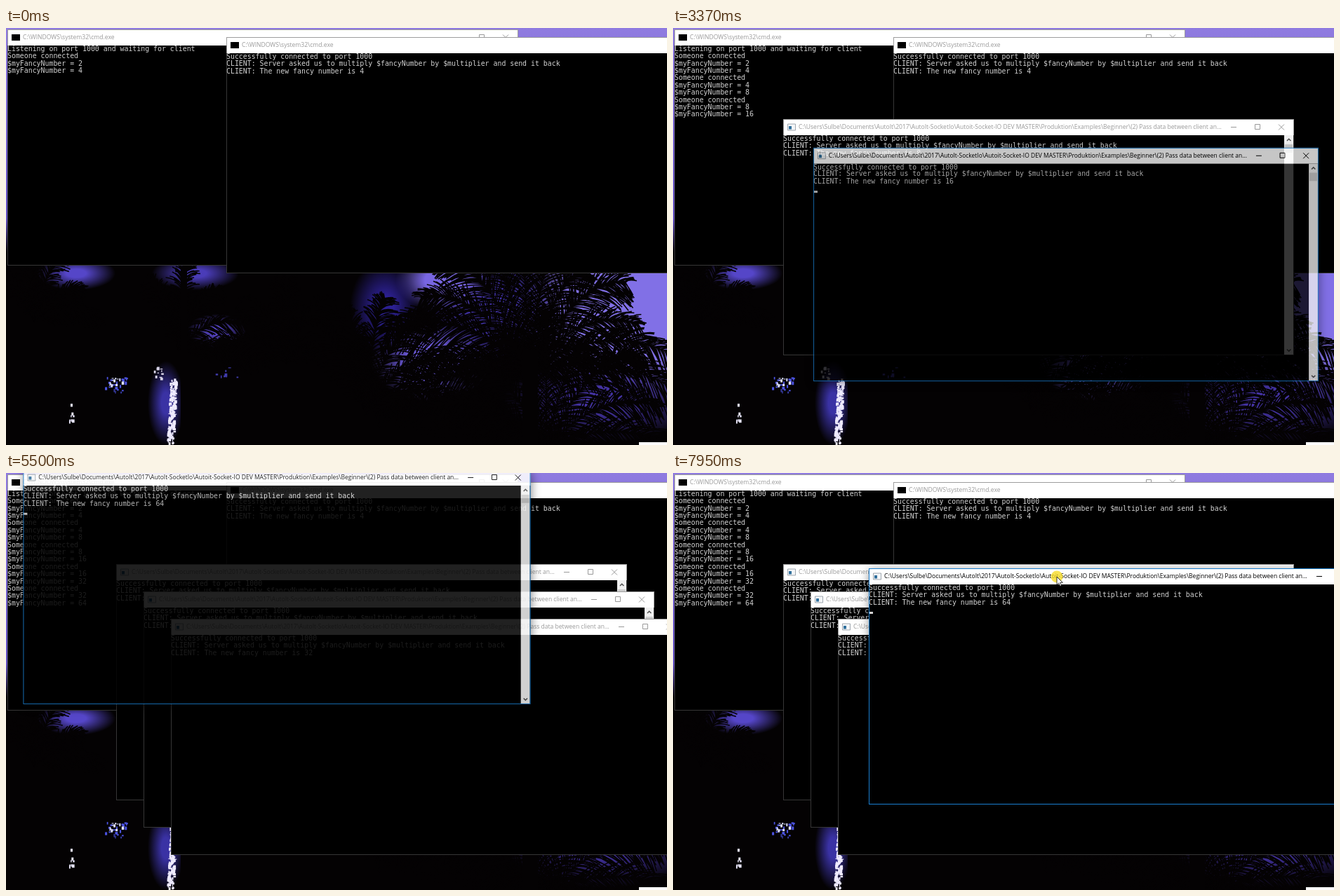
An HTML page with a canvas that plays this animation: 942 px wide and 595 px high, repeating every 8000 ms.

```html
<!DOCTYPE html>
<html lang="en">
<head>
<meta charset="utf-8">
<title>Socket demo</title>
<style>
  html, body { margin: 0; width: 100%; height: 100%; overflow: hidden; background: #040203; }
  #stage { position: absolute; left: 0; top: 0; width: 942px; height: 595px; overflow: hidden; }
  #photo { position: absolute; left: 0; top: 0; }
  .win { position: absolute; left: 0; top: 0; width: 728px; height: 337px; background: #000; color: #999; }
  .win::after { content: ""; position: absolute; inset: 0; border: 1px solid rgba(90, 90, 90, .6); }
  .win.active { color: #000; box-shadow: 1px 3px 13px rgba(0, 0, 0, .5); }
  .win.active::after { border-color: #1a7fd0; }
  .bar { position: absolute; left: 0; top: 0; width: 100%; height: 23px; background: #fff; }
  .name { position: absolute; left: 22px; top: 0; white-space: pre; font: 8.55px/23px "Open Sans", "Noto Sans", sans-serif; }
  .win svg { position: absolute; left: 0; top: 0; fill: none; }
  .text { position: absolute; left: 0; top: 22.8px; margin: 0; color: #d2d2d2;
          font: 9.88px/10.4px "DejaVu Sans Mono", monospace; }
  .caret { position: absolute; left: 0; top: 62px; width: 6px; height: 3px; background: #d4d4d4; }
  #pointer { position: absolute; left: 0; top: 0; width: 30px; height: 30px; }
</style>
</head>
<body>
<div id="stage">
  <canvas id="photo" width="942" height="595"></canvas>
</div>
<script>
const LOOP = 8000;
const stage = document.getElementById('stage');
const mix = (a, b, u) => a + (b - a) * u;

// ---------- wallpaper ----------
function paintPhoto() {
  const DARK = '#040203';
  const g = document.getElementById('photo').getContext('2d');
  let seed = 11;
  const rnd = () => (seed = (seed * 16807) % 2147483647) / 2147483647;

  const glow = (x, y, rx, ry, color, core = .25) => {
    g.save();
    g.translate(x, y);
    g.scale(rx, ry);
    const fade = g.createRadialGradient(0, 0, 0, 0, 0, 1);
    fade.addColorStop(core, color);
    fade.addColorStop(1, color + '00');
    g.fillStyle = fade;
    g.fillRect(-1, -1, 2, 2);
    g.restore();
  };

  // arching rib with drooping leaflets on both sides
  const frond = (x0, y0, angle, reach) => {
    const c = Math.cos(angle) * reach, s = Math.sin(angle) * reach;
    const cx = x0 + c * .5, cy = y0 + s * .75 - reach * .05;
    const x1 = x0 + c, y1 = y0 + s + Math.abs(c) * .3;
    g.beginPath();
    g.moveTo(x0, y0);
    g.quadraticCurveTo(cx, cy, x1, y1);
    const count = reach * .42;
    for (let i = 3; i < count; i++) {
      const u = i / count;
      const x = mix(mix(x0, cx, u), mix(cx, x1, u), u);
      const y = mix(mix(y0, cy, u), mix(cy, y1, u), u);
      const rib = Math.atan2(mix(cy - y0, y1 - cy, u), mix(cx - x0, x1 - cx, u));
      for (const side of [-1, 1]) {
        const a = rib + side * mix(.5, .9, rnd());
        const l = reach * .25 * Math.sin(Math.PI * (.15 + u * .75)) * mix(.6, 1.1, rnd());
        g.moveTo(x, y);
        g.quadraticCurveTo(x + Math.cos(a) * l / 2, y + Math.sin(a) * l / 2,
          x + Math.cos(a) * l, y + Math.sin(a) * l + l * .35);
      }
    }
    g.stroke();
  };

  const palm = (x, y, reach, from, to, count) => {
    g.strokeStyle = DARK;
    g.lineWidth = 1.6;
    for (let i = 0; i < count; i++) {
      const deg = mix(from, to, i / (count - 1));
      frond(x, y, deg * Math.PI / 180, reach * mix(.85, 1.1, rnd()));
    }
  };

  const sparks = (x, y, w, h, count, color) => {
    g.fillStyle = color;
    for (let i = 0; i < count; i++) {
      g.fillRect(x + (rnd() - .5) * w, y + (rnd() - .5) * h, 1 + rnd() * 3, 1 + rnd() * 4);
    }
  };

  g.fillStyle = DARK;
  g.fillRect(0, 0, 942, 595);
  const sky = g.createLinearGradient(0, 0, 0, 320);
  sky.addColorStop(0, '#8f7be0');
  sky.addColorStop(.85, '#6552c4');
  sky.addColorStop(1, DARK);
  g.fillStyle = sky;
  g.fillRect(0, 0, 942, 320);

  glow(900, 400, 180, 140, '#8170e6', .55);
  glow(850, 530, 140, 62, '#4433a4');
  glow(690, 400, 100, 90, '#4636b4');
  glow(625, 360, 70, 45, '#7866e2', .4);
  glow(605, 475, 85, 58, '#6a58d8', .4);
  glow(540, 400, 50, 70, '#2c2092');
  glow(100, 350, 56, 24, '#5546c8');
  glow(270, 350, 62, 24, '#4a3cb8');
  glow(300, 432, 42, 24, '#5544c4');
  glow(228, 535, 26, 60, '#3a32a4');

  palm(40, 420, 110, -120, -20, 5);
  palm(245, 460, 120, -110, -10, 5);
  palm(400, 480, 130, -150, -30, 5);
  palm(510, 545, 175, -120, -20, 6);
  palm(745, 490, 215, -178, -8, 13);
  palm(770, 600, 200, -165, -15, 9);
  g.fillStyle = DARK;
  g.fillRect(736, 460, 22, 135);
  g.fillRect(249, 340, 9, 255);
  glow(560, 595, 240, 50, DARK);

  // lights behind the trees
  sparks(156, 508, 30, 22, 22, '#4b52e0');
  sparks(156, 506, 22, 14, 14, '#dde0ff');
  sparks(92, 548, 8, 24, 8, '#e4e2f4');
  sparks(217, 492, 16, 22, 10, '#d8d4e8');
  sparks(315, 490, 34, 20, 8, '#403cae');
  for (let y = 502; y < 592; y += 3) sparks(238 - (y - 502) * .05, y, 9, 6, 7, '#eeeaff');
  g.fillStyle = '#fff';
  g.fillRect(902, 591, 40, 4);
}

// ---------- windows ----------
const CMD = 'C:\\WINDOWS\\system32\\cmd.exe';
const EXE = 'C:\\Users\\Sulbe\\Documents\\AutoIt\\2017\\AutoIt-SocketIo\\Autoit-Socket-IO DEV MASTER' +
  '\\Produktion\\Examples\\Beginner\\(2) Pass data between client an...';

const clientText = n => 'Successfully connected to port 1000\n' +
  'CLIENT: Server asked us to multiply $fancyNumber by $multiplier and send it back\n' +
  `CLIENT: The new fancy number is ${n}`;

function serverText(count) {
  let s = 'Listening on port 1000 and waiting for client';
  for (let i = 1; i <= count; i++) {
    s += `\nSomeone connected\n$myFancyNumber = ${2 ** i}\n$myFancyNumber = ${2 ** (i + 1)}`;
  }
  return s;
}

const cmdIcon = '<path d="M6 7h12v9h-12z" fill="#000"/>';
const exeIcon = '<path d="M6.5 7h11v9h-11z" fill="#f4f6f8" stroke="#8a949c" stroke-width=".8"/>' +
  '<path d="M8 10h4v4.5h-4z" fill="#2f6f9c"/>';

function makeWin(title, icon, text) {
  const el = document.createElement('div');
  el.className = 'win';
  el.innerHTML = `<div class="bar"></div><div class="name"></div>
    <svg width="728" height="337">${icon}
      <path stroke="currentColor" d="M638 11.5h8M672.5 7.5h7v7h-7zM706 7.5l8 8m0-8l-8 8"/>
      <path fill="#f0f0f0" d="M714 23h13v313h-13z"/>
      <path fill="#cdcdcd" d="M715 36h11v12h-11z"/>
      <path stroke="#505050" stroke-width="1.5" d="M718 31l2.7-2.7 2.7 2.7M718 328.5l2.7 2.7 2.7-2.7"/>
    </svg><pre class="text"></pre><div class="caret"></div>`;
  el.querySelector('.name').textContent = title;
  const body = el.querySelector('.text');
  body.textContent = text;
  stage.append(el);
  return { el, body, caret: el.querySelector('.caret') };
}

function place(win, x, y, p = 1) {
  win.el.style.transform = `translate(${x}px,${y}px) scale(${mix(.95, 1, p)})`;
  win.el.style.opacity = p;
}

paintPhoto();
const server = makeWin(CMD, cmdIcon, '');
const first = makeWin(CMD, cmdIcon, clientText(4));
for (const w of [server, first]) w.caret.style.display = 'none';
place(server, 2, 2);
place(first, 314, 13);

// windows cascade by 39 px; the last one wraps to the top left
const clients = [
  { join: 500, open: 500, blur: 3080 },
  { join: 3300, open: 3296, blur: 4250 },
  { join: 4470, open: 4518, blur: 5090 },
  { join: 5320, open: 5406, blur: Infinity }
];
clients.forEach((c, i) => {
  c.win = makeWin(EXE, exeIcon, clientText(8 << i));
  c.x = 157 + 39 * i;
  c.y = 130 + 39 * i;
});
const last = clients[clients.length - 1];
Object.assign(last, { x: 22, y: -6 });

// ---------- pointer ----------
const pointer = document.createElement('div');
pointer.id = 'pointer';
pointer.innerHTML = `<svg width="30" height="30" style="overflow:visible">
  <circle r="8.5" fill="#f8dc28" fill-opacity=".8"/>
  <path d="M0 0V11.5L2.7 9 4.6 13.4 6.6 12.5 4.7 8.3H8.3Z" fill="#fff" stroke="#000" stroke-width=".8"/></svg>`;
stage.append(pointer);
const halo = pointer.querySelector('circle');

// key points: time, x, y
const drag = [[7360, 290, 6], [7440, 278, 10], [7670, 357, 44], [7950, 547, 148], [LOOP, 547, 148]];
const trips = [
  [[970, 841, 239], [1190, 841, 239], [1810, 337, 192], [2060, 337, 192], [2130, 926, 208], [2210, 926, 208]],
  [[6100, 919, 76], [6190, 919, 76]],
  [[6330, 262, 44], [6900, 326, 1], [7130, 326, 1]],
  drag
];

function follow(trip, t) {
  const i = trip.findIndex(k => k[0] > t);
  if (i < 1) return null;
  const [t0, x0, y0] = trip[i - 1], [t1, x1, y1] = trip[i];
  const u = (t - t0) / (t1 - t0);
  return [Math.round(mix(x0, x1, u)), Math.round(mix(y0, y1, u))];
}

// ---------- timeline ----------
const show = (el, on) => { el.style.display = on ? '' : 'none'; };
let joined = -1;

function render(t) {
  const count = 1 + clients.filter(c => t >= c.join).length;
  if (count !== joined) server.body.textContent = serverText(joined = count);

  for (const c of clients) {
    const { el, caret } = c.win;
    const age = t - c.open;
    const active = t < c.blur;
    const blink = Math.floor((t - c.join - 1020) / 530);
    show(el, age > 0);
    show(caret, active && (blink < 0 || blink % 2));
    el.classList.toggle('active', active);
    place(c.win, c.x, c.y, 1 - (1 - Math.min(1, Math.max(0, age) / 240)) ** 4);
  }

  const held = follow(drag, t);
  if (held) place(last.win, held[0] - 268, held[1] - 12);
  const spot = trips.map(trip => follow(trip, t)).find(Boolean);
  show(pointer, spot);
  show(halo, held);
  if (spot) pointer.style.transform = `translate(${spot[0]}px,${spot[1]}px)`;
}

const start = performance.now();
function tick() {
  render((performance.now() - start) % LOOP);
  requestAnimationFrame(tick);
}
tick();
</script>
</body>
</html>
```
